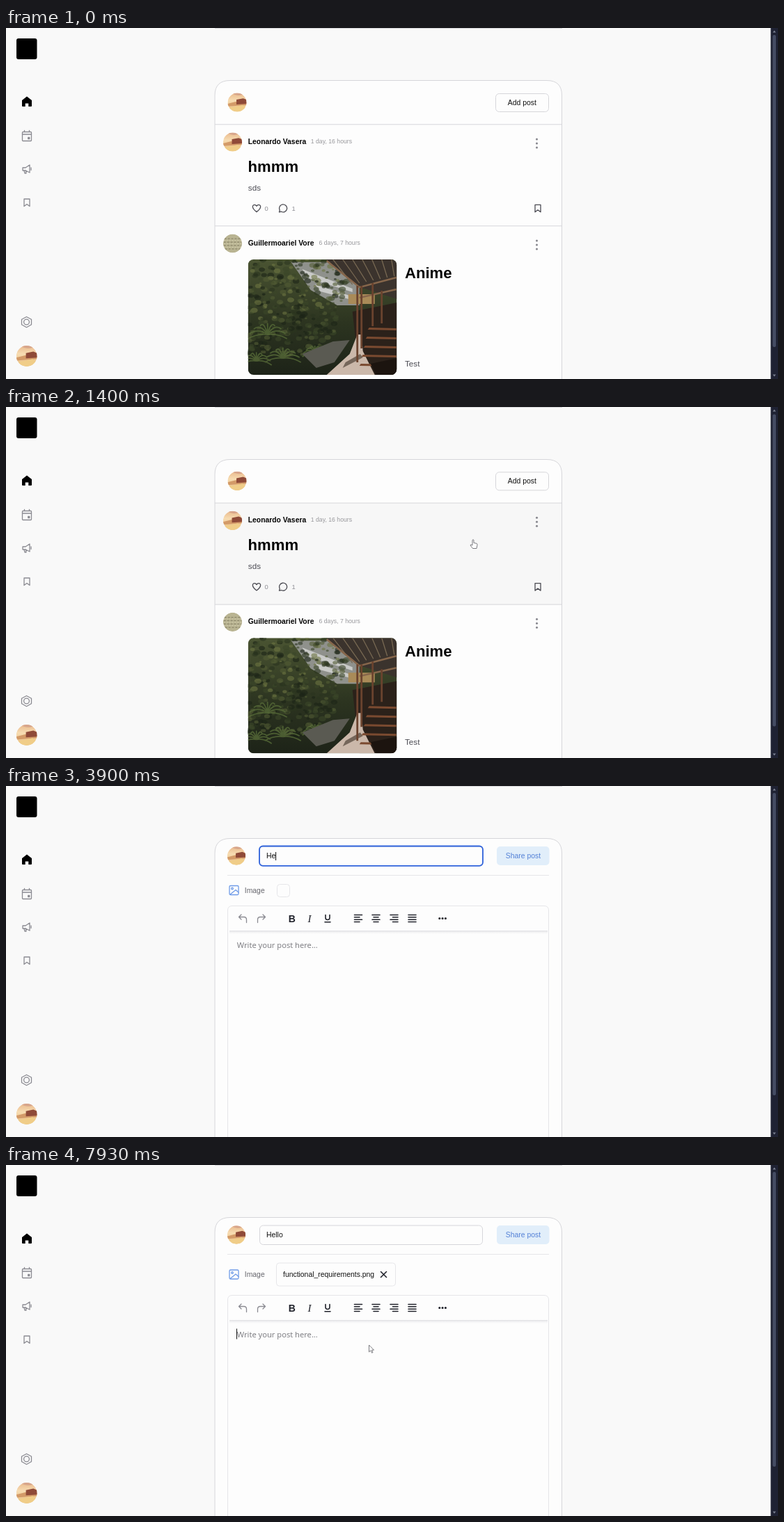
Animation, 1109 px wide and 505 px high, one loop 8 s. Source, as an HTML page:

```html
<!DOCTYPE html>
<html lang="en">
<head>
<meta charset="utf-8">
<title>Post feed</title>
<style>
  html, body { margin: 0; width: 100%; height: 100%; overflow: hidden; background: #f9f9f9; }
  svg { display: block; width: 1109px; height: 505px; }
  text { font: 10.4px "Liberation Sans", Arial, sans-serif; fill: #111; white-space: pre; }
  .name { font-weight: 700; font-size: 10.35px; fill: #050505; }
  .when { font-size: 8.7px; fill: #98989c; }
  .title { font-weight: 700; font-size: 22.1px; fill: #050505; }
  .body { font-size: 11.7px; fill: #4c4c54; }
  .count { font-size: 9.4px; fill: #8e8e94; }
  .ghost { fill: #929298; }
  .note { font: 11.2px "Open Sans", "Noto Sans", sans-serif; fill: #77777c; }
  .line { fill: none; stroke: #d6d6da; }
  .soft { fill: none; stroke: #e6e6e9; }
  .icon { fill: none; stroke: #8b8b92; stroke-width: 1.3; stroke-linejoin: round; stroke-linecap: round; }
  .dark { stroke: #4b4b52; }
  .ink { stroke: #20222b; stroke-width: 1.6; }
</style>
</head>
<body>
<svg viewBox="0 0 1109 505">
  <defs>
    <linearGradient id="dusk" x2="0" y2="1">
      <stop offset="0" stop-color="#e9b98c"/>
      <stop offset=".4" stop-color="#f7dcb2"/>
      <stop offset="1" stop-color="#e6b878"/>
    </linearGradient>
    <linearGradient id="shade" x2="0" y2="1">
      <stop offset="0" stop-color="#dedee2"/>
      <stop offset="1" stop-color="#fdfdfd" stop-opacity="0"/>
    </linearGradient>
    <linearGradient id="grove" x2="0" y2="1">
      <stop offset="0" stop-color="#4a5432"/>
      <stop offset=".55" stop-color="#2c3420"/>
      <stop offset="1" stop-color="#1d2318"/>
    </linearGradient>
    <clipPath id="round"><circle r="14"/></clipPath>
    <clipPath id="inner"><path d="M300 505V97Q300 75.500 322 75.500H777Q798.500 75.500 798.500 97V505Z"/></clipPath>
    <clipPath id="frame"><rect width="213.500" height="166" rx="8"/></clipPath>
    <g id="me" clip-path="url(#round)">
      <circle r="14" fill="url(#dusk)"/>
      <path d="M-14 2L-2 -1L14 0V4L-14 6Z" fill="#d39a68"/>
      <path d="M-1 -4L9 -6L14 -4V2L-1 3Z" fill="#8f4a38"/>
      <path d="M-14 9L8 4L14 9V14H-14Z" fill="#f0cd88"/>
      <path d="M-8 -14Q0 -8 9 -12V-14Z" fill="#d7a58b"/>
    </g>
    <g id="other" clip-path="url(#round)">
      <circle r="14" fill="#b9b492"/>
      <path d="M-12 -7H12M-13 -2H13M-13 3H13M-11 8H11" stroke="#8d886c" stroke-width="1.300" stroke-dasharray="3 2"/>
      <path d="M-13 -4.500H13M-13 .5H13M-13 5.500H13" stroke="#d4cfb0" stroke-dasharray="2 2"/>
    </g>
    <path id="mark" d="M-4 -5H4V5.500L0 2.500L-4 5.500Z"/>
    <path id="heart" d="M0 5.300C-8 -.5 -6 -5 -3 -5Q-1 -5 0 -3Q1 -5 3 -5C6 -5 8 -.5 0 5.300Z"/>
    <path id="talk" d="M-5.500 5.500L-4.700 2.700A5.500 5.500 0 1 1 -2.500 4.900Z"/>
    <path id="back" d="M-2 -6L-5.500 -2.500L-2 1M-5.500 -2.500H2Q5.500 -2.500 5.500 1.500V5.500"/>
  </defs>

  <rect width="1109" height="505" fill="#f9f9f9"/>
  <path class="line" d="M300 .5H799"/>

  <rect x="15" y="15" width="29.500" height="30" rx="3"/>
  <path d="M30 98.500L37 104V112Q37 113 36 113H32.300V108.500H27.700V113H24Q23 113 23 112V104Z"/>
  <g class="icon">
    <rect x="23.500" y="149.500" width="13" height="13" rx="1"/>
    <path d="M23.500 153H36.500M26.500 147.500V149M33.500 147.500V149"/>
    <rect x="31.800" y="157.500" width="2" height="2" fill="#8b8b92"/>
    <path d="M24 201H28L34 197V208L28 205H24ZM26 205L27 209H29L28.500 205M36 201V204.500"/>
    <use href="#mark" x="30" y="251"/>
    <path d="M29.500 415.500L36.500 419.300V426.800L29.500 430.700L22.500 426.800V419.300Z"/>
    <circle cx="29.500" cy="423" r="3.900"/>
  </g>
  <use href="#me" transform="translate(29.700 472) scale(1.070)"/>

  <path d="M300 505V97Q300 75.500 322 75.500H777Q798.500 75.500 798.500 97V505" fill="#fdfdfd"/>
  <g clip-path="url(#inner)">
    <g id="feed"></g>
    <g id="composer"></g>
  </g>
  <path class="line" d="M300 505V97Q300 75.500 322 75.500H777Q798.500 75.500 798.500 97V505"/>

  <rect x="1098.500" width="10.500" height="505" fill="#1f2233"/>
  <rect id="thumb" x="1101.300" y="10" width="4.700" height="449" rx="2" fill="#454c63"/>
  <path d="M1101.500 6.500L1103.700 3.500L1106 6.500ZM1101.500 498.500L1103.700 501.500L1106 498.500Z" fill="#7c8192"/>

  <g id="cursor" fill="#fff" stroke="#6c6c72" stroke-width=".9" stroke-linejoin="round">
    <path id="arrow" d="M0 0V10L2.400 7.800L4 11.300L5.500 10.600L4 7.200H7Z"/>
    <path id="hand" d="M-1 1Q0 -.6 1 1V5L5 5.800Q6.200 6.200 6 8L5 13H-.5L-4 8.500Q-4 6.500 -1 8.500Z"/>
  </g>
</svg>

<script>
const LOOP = 8000;
const $ = id => document.getElementById(id);
const text = (cls, x, y, s) => `<text class="${cls}" x="${x}" y="${y}">${s}</text>`;
const use = (id, x, y) => `<use href="#${id}" x="${x}" y="${y}"/>`;
const path = (fill, d) => `<path fill="${fill}" d="${d}"/>`;

function randomizer(seed) {
  return () => (seed = seed * 16807 % 2147483647) / 2147483647;
}

// Small leaves, brighter towards the top
function foliage() {
  const rnd = randomizer(77);
  const greens = ['#1c2317', '#2b351f', '#3b4729', '#525d34', '#6d7642'];
  let out = '';
  for (let i = 0; i < 420; i++) {
    const y = rnd() * 140, x = rnd() * (150 - y * .25);
    const tone = greens[Math.floor(rnd() * (y > 85 ? 4 : 5))];
    const r = 1.2 + rnd() * 2.6;
    out += `<ellipse cx="${x.toFixed(1)}" cy="${y.toFixed(1)}" rx="${(r * 1.4).toFixed(1)}" ry="${r.toFixed(1)}" fill="${tone}" opacity=".6"/>`;
  }
  return out;
}

function ferns() {
  let d = '';
  for (const [cx, cy, r] of [[28, 108, 28], [50, 142, 26], [12, 146, 22], [96, 134, 18]]) {
    for (let i = 0; i < 9; i++) {
      const a = Math.PI * (1 + i / 8);
      const ex = cx + Math.cos(a) * r, ey = cy + Math.sin(a) * r * .7 + 6;
      d += `M${cx} ${cy}Q${(cx + ex) / 2} ${ey - 8} ${ex.toFixed(1)} ${ey.toFixed(1)}`;
    }
  }
  return `<path d="${d}" fill="none" stroke="#566a38" stroke-width="1.800" opacity=".8"/>`;
}

// Garden courtyard beside a roofed walkway
function photo(x, y) {
  let slats = '', benches = '';
  for (let i = 0; i < 7; i++) slats += `M${122 + i * 14} 0L${150 + i * 10} ${36 - i * 2}`;
  for (let i = 0; i < 5; i++) {
    const by = 98 + i * 13;
    benches += path('#7a4a30', `M${174 - i * 3} ${by}L213 ${by + 1}V${by + 4}L${172 - i * 3} ${by + 3}Z`);
  }
  return `<g transform="translate(${x} ${y})" clip-path="url(#frame)">
    <rect width="214" height="166" fill="url(#grove)"/>
    ${path('#8f918c', 'M62 4H118L160 36V66H128L90 44Z')}
    ${path('#c9cac8', 'M78 14L150 42V47L84 26ZM96 36L152 54V59L104 46Z')}
    ${path('#a98b58', 'M144 50H182V64H144Z')}
    ${foliage()}
    ${ferns()}
    ${path('#5a5a52', 'M78 136L122 118L146 116L124 148L98 156Z')}
    ${path('#2b211a', 'M150 75L214 62V166H160Z')}
    ${path('#cbb8aa', 'M113 166L146 136L157 108H163L165 132L182 166Z')}
    ${path('#75665a', 'M140 148L161 136L165 141L136 156Z')}
    ${path('#3b332d', 'M112 0H214V57L158 39Z')}
    <path d="${slats}" stroke="#776852" stroke-width="1.300"/>
    <path d="M113 2L160 40L213 26M160 55L213 43" fill="none" stroke="#86664b" stroke-width="2.500"/>
    ${benches}
    <path d="M157 38V148M163 38V128M179 34V96M192 45V92" stroke="#6a432e" stroke-width="2.800"/>
    ${path('#1c140f', 'M176 150L214 142V166H184Z')}
  </g>`;
}

const dots = y => [-6, 0, 6].map(d => `<circle cx="762.500" cy="${y + d}" r="1.500" fill="#85858c"/>`).join('');
const header = (y, who, name, x, when) =>
  `<use href="#${who}" transform="translate(325.500 ${y + 1}) scale(.97)"/>` +
  text('name', 347.8, y + 3.5, name) + text('when', x, y + 3, when) + dots(y + 3);
const actions = (y, likes, replies) =>
  `<g class="icon dark">${use('heart', 360, y)}${use('talk', 398, y)}${use('mark', 764, y)}</g>` +
  text('count', 371.5, y + 3.5, likes) + text('count', 410.5, y + 3.5, replies);

$('feed').innerHTML = `
  <rect id="hover" x="300" y="139" width="499" height="146" fill="#f7f7f7"/>
  <use href="#me" transform="translate(332 107) scale(.97)"/>
  <rect class="line" x="703.500" y="94.500" width="76" height="26" rx="5"/>
  ${text('', 720.8, 110.7, 'Add post')}
  <path class="line" d="M300 138.800H799M300 284.800H799M300 543.500H799"/>
  ${header(163, 'me', 'Leonardo Vasera', 437.8, '1 day, 16 hours')}
  ${text('title', 347.6, 207, 'hmmm')}
  ${text('body', 347.8, 233.7, 'sds')}
  ${actions(259.3, 0, 1)}
  ${header(309, 'other', 'Guillermoariel Vore', 449.5, '6 days, 7 hours')}
  ${photo(347.7, 333)}
  ${text('title', 573, 359.7, 'Anime')}
  ${text('body', 573, 486.5, 'Test')}
  ${actions(518, 0, 0)}`;

// Four text lines; the short ones run between the given offsets
const align = (x, from, to) =>
  [-5, -1.7, 1.7, 5].map((y, i) => i % 2
    ? `M${x + from} ${190.5 + y}H${x + to}`
    : `M${x - 5.5} ${190.5 + y}H${x + 5.5}`).join('');

$('composer').innerHTML = `
  <use href="#me" transform="translate(331 100.500) scale(.94)"/>
  <rect class="line" x="364.500" y="87" width="320" height="27.500" rx="5"/>
  <rect id="ring" x="364" y="86.500" width="321" height="28.300" rx="5" fill="none" stroke="#2f63dc" stroke-width="1.800"/>
  ${text('ghost', 374, 104, '<tspan id="hint">Enter title here...</tspan>')}
  <text id="typed" x="374" y="104"></text>
  <path id="caret" d="M0 95V107" stroke="#111"/>
  <rect x="705" y="87" width="75.500" height="27" rx="5" fill="#e1eefa"/>
  <text x="717.800" y="104" style="fill:#5380d6">Share post</text>
  <path class="soft" d="M318 128.500H780"/>
  <g id="row">
    <g class="icon" style="stroke:#6f9be8">
      <rect x="321" y="143.500" width="13" height="13" rx="1.500"/>
      <circle cx="325" cy="147.500" r="1.300"/>
      <path d="M322 156L330 149.500L334 153"/>
    </g>
    <text x="342.800" y="153.700" style="fill:#66666d">Image</text>
  </g>
  <rect id="chip" class="soft" rx="4"/>
  <g id="file">
    ${text('', 398, 161, 'functional_requirements.png')}
    <path class="icon ink" d="M538.500 153.500L546.500 161.500M546.500 153.500L538.500 161.500"/>
  </g>
  <g id="editor">
    <path class="soft" d="M318.500 520V179Q318.500 172.500 325 172.500H773Q779.500 172.500 779.500 179V520"/>
    <rect x="321" y="208" width="457" height="6" fill="url(#shade)"/>
    <g class="icon">
      ${use('back', 340, 191)}
      <use href="#back" transform="translate(367 191) scale(-1 1)"/>
    </g>
    <text x="405.800" y="195.700" style="font-weight:700;font-size:14px;fill:#20222b">B</text>
    <text x="433.500" y="195.700" style="font:italic 15px 'Liberation Serif',serif;fill:#20222b">I</text>
    <path class="icon ink" d="M459 185.500V189.500Q459 192.500 462 192.500T465 189.500V185.500M458 195.800H466"/>
    <path class="icon ink" d="${align(506, -5.5, 2)}${align(531.5, -3.5, 3.5)}${align(557.5, -2, 5.5)}${align(583.5, -5.5, 5.5)}"/>
    <path d="M622.800 190.500H631.500" stroke="#20222b" stroke-width="3.200" stroke-linecap="round" stroke-dasharray="0 4.300"/>
    ${text('note', 331.8, 233, 'Write your post here...')}
    <path id="noteCaret" d="M331.500 220.500V235.500" stroke="#111"/>
  </g>`;

const SWITCH = 1900, FOCUS = 2640, BLUR = 5770, ATTACH = 6900, WRITE = 7500;
const KEYS = [3500, 3900, 4070, 4200, 4370];
const SCROLL = [[840, 0], [900, 8.6], [980, 32], [1060, 44], [1190, 44], [1270, 20], [1340, 5], [1400, .7], [1450, 0]];
const MOUSE = [
  [130, 900, 510], [800, 672, 190], [1400, 671, 190.5], [1470, 671, 190.5], [1770, 741, 103],
  [2050, 741, 103], [2470, 520, 102], [4930, 520, 102], [5730, 326.5, 153.5],
  [7130, 326.5, 153.5], [7270, 514, 256], [7830, 514, 256], [7930, 521.5, 259]
];

const clamp = v => Math.max(0, Math.min(1, v));
const smooth = p => p * p * (3 - 2 * p);
const linear = p => p;

function at(track, t, col, ease) {
  if (t <= track[0][0]) return track[0][col];
  const i = track.findIndex(k => k[0] > t);
  if (i < 0) return track[track.length - 1][col];
  const a = track[i - 1], b = track[i];
  return a[col] + (b[col] - a[col]) * ease((t - a[0]) / (b[0] - a[0]));
}

const set = (id, attrs) => {
  for (const k in attrs) $(id).setAttribute(k, attrs[k]);
};
const show = (id, on) => set(id, { visibility: on ? 'visible' : 'hidden' });
const inside = (x, y, l, t, r, b) => x > l && x < r && y > t && y < b;

function drawCursor(t, open, scroll) {
  const x = at(MOUSE, t, 1, smooth), y = at(MOUSE, t, 2, smooth);
  const hand = open
    ? inside(x, y, 318, 138, 375, 170) || inside(x, y, 705, 87, 780, 114)
    : inside(x, y, 300, 139, 799, 505) || inside(x, y, 703, 94, 780, 121);
  const overInput = open && inside(x, y, 364, 87, 685, 115);
  set('cursor', { transform: `translate(${x} ${y})` });
  show('hand', hand && !overInput);
  show('arrow', t >= 130 && !hand && !overInput);
  set('hover', { opacity: inside(x, y + scroll, 300, 139, 799, 285) ? 1 : 0 });
}

function render(t) {
  const open = t >= SWITCH, attached = t >= ATTACH;
  const scroll = at(SCROLL, t, 1, linear);
  set('feed', { transform: `translate(0 ${-scroll})`, display: open ? 'none' : 'inline' });
  set('composer', { display: open ? 'inline' : 'none' });
  set('thumb', { y: 10 + scroll * .85, height: attached ? 424 : open ? 435 : 449 });
  drawCursor(t, open, scroll);
  if (!open) return;

  const n = KEYS.filter(k => k <= t).length;
  $('typed').textContent = 'Hello'.slice(0, n);
  show('hint', !n);
  set('ring', { opacity: clamp((t - 2670) / 90) * (1 - clamp((t - BLUR) / 150)) });

  const last = n ? KEYS[n - 1] : FOCUS;
  const blink = (t - last) % 1060 < 530;
  const caretX = 374.3 + (n ? $('typed').getComputedTextLength() : 0);
  set('caret', { transform: `translate(${caretX} 0)`, opacity: t >= 2700 && t < BLUR && blink ? 1 : 0 });

  set('row', { transform: `translate(0 ${attached ? 7.5 : 0})` });
  set('editor', { transform: `translate(0 ${attached ? 15 : 0})` });
  set('chip', attached
    ? { x: 388.5, y: 141, width: 171, height: 33 }
    : { x: 389.5, y: 141.5, width: 18, height: 18 });
  set('file', { display: attached ? 'inline' : 'none' });
  set('noteCaret', { opacity: t >= WRITE ? 1 : 0 });
}

const start = performance.now();
function tick() {
  render((performance.now() - start) % LOOP);
  requestAnimationFrame(tick);
}
tick();
</script>
</body>
</html>
```
